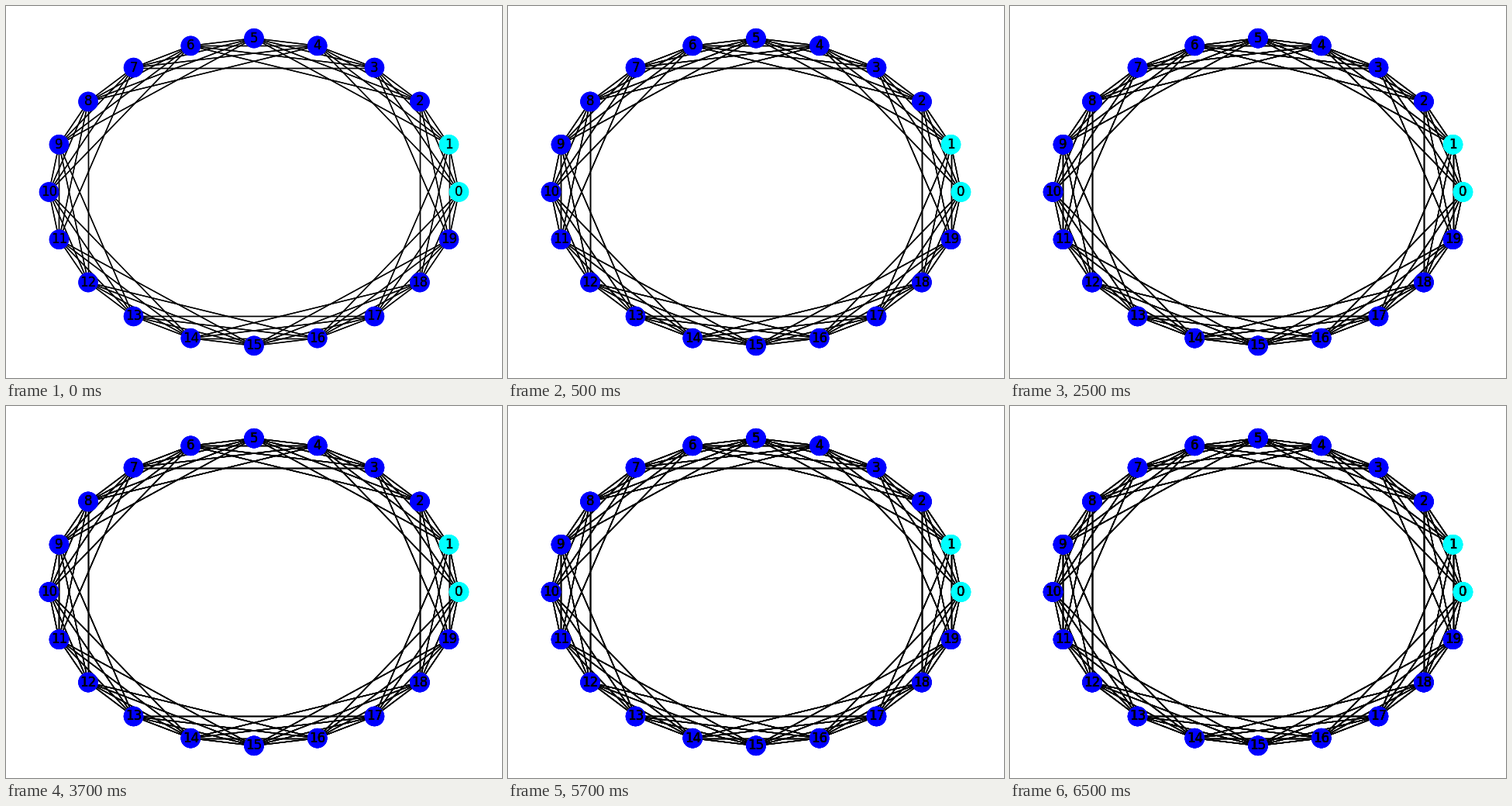
Write a matplotlib script that moves like this. It is 640x480 px and loops after 8000 ms.

```python
import numpy as np
import matplotlib.pyplot as plt
from matplotlib.animation import FuncAnimation
from matplotlib.collections import LineCollection

NODES = 20
REACH = 4          # each node links to this many neighbours per side
FIRST_PASSES = 2   # stacked drawings visible when the loop starts
REDRAWS = 4
LIMIT = 1.21

plt.rcParams["font.family"] = "DejaVu Sans"
fig = plt.figure(figsize=(6.4, 4.8), dpi=100, facecolor="white")
ax = fig.add_axes((0, 0, 1, 1))
ax.set_axis_off()

angles = 2 * np.pi * np.arange(NODES) / NODES
points = np.column_stack([np.cos(angles), np.sin(angles)])
edges = [(points[i], points[(i + step) % NODES])
         for i in range(NODES) for step in range(1, REACH + 1)]
colors = ["cyan"] * 2 + ["blue"] * (NODES - 2)


def draw_graph():
    """Draw the whole graph once and return its artists."""
    lines = ax.add_collection(
        LineCollection(edges, colors="black", linewidths=1, zorder=1))
    dots = ax.scatter(*points.T, s=300, c=colors, zorder=2)
    labels = [ax.text(x, y, str(i), size=12, ha="center", va="center", zorder=3)
              for i, (x, y) in enumerate(points)]
    return [lines, dots, *labels]


passes = [draw_graph() for _ in range(FIRST_PASSES + REDRAWS)]
ax.set(xlim=(-LIMIT, LIMIT), ylim=(-LIMIT, LIMIT))


def update(frame):
    # The graph is drawn over itself again every 2 s, starting at 0.5 s.
    shown = FIRST_PASSES + (frame + 3) // 4
    for i, artists in enumerate(passes):
        for artist in artists:
            artist.set_visible(i < shown)
    return [artist for artists in passes for artist in artists]


animation = FuncAnimation(fig, update, frames=16, interval=500,
                          repeat=True, repeat_delay=0, blit=False)
plt.show()
```
